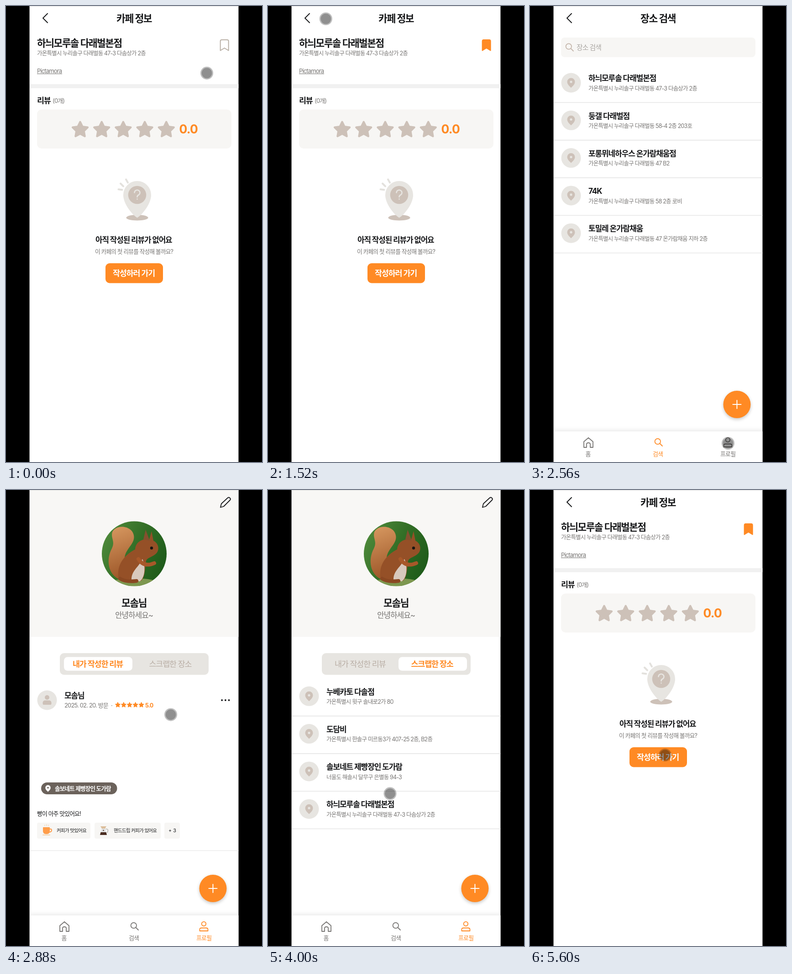
Write an HTML page with a canvas that moves like this. It is 561 px wide and 998 px high and loops after 5680 ms.

```html
<!DOCTYPE html>
<html lang="ko">
<head>
<meta charset="utf-8">
<style>
html, body { margin: 0; width: 561px; height: 998px; overflow: hidden; background: #000; }
canvas { display: block; }
</style>
</head>
<body>
<canvas id="stage" width="561" height="998"></canvas>
<script>
const ctx = document.getElementById('stage').getContext('2d');
const LOOP = 5680;
const ORANGE = '#ff8a24', INK = '#17181a', GRAY = '#777573', TAN = '#cdc1b8', STONE = '#e7e5e1', PALE = '#f7f6f4';

const SHOP = '하늬모루솔 다래벌본점';
const SHOP_ADDRESS = '가온특별시 누리솔구 다래벌동 47-3 다솜상가 2층';
const USER = '모솜님';
const BAKERY = '솔보네트 제빵장인 도가람';
const PLACES = [
  [SHOP, SHOP_ADDRESS],
  ['둥갤 다래벌점', '가온특별시 누리솔구 다래벌동 58-4 2층 203호'],
  ['포롱뮈네하우스 온가람채움점', '가온특별시 누리솔구 다래벌동 47 B2'],
  ['74K', '가온특별시 누리솔구 다래벌동 58 2층 로비'],
  ['토밀레 온가람채움', '가온특별시 누리솔구 다래벌동 47 온가람채움 지하 2층']
];
const SCRAPS = [
  ['누베카토 다솔점', '가온특별시 윗구 솔내로2가 80'],
  ['도담비', '가온특별시 한솔구 미르동3가 407-25 2층, B2층'],
  [BAKERY, '너울도 해솔시 달무구 은별동 94-3'],
  [SHOP, SHOP_ADDRESS]
];

// Pointer stops: time, x, y
const POINTER = [
  [0, 440, 147], [400, 481, 88], [1040, 481, 88], [1280, 392, 60], [1520, 127, 28], [1680, 86, 27],
  [2000, 86, 27], [2160, 140, 131], [2480, 434, 957], [2640, 434, 957], [2880, 361, 492],
  [3120, 374, 387], [3520, 374, 387], [4080, 250, 710], [4720, 250, 710], [5080, 296, 580], [LOOP, 296, 580]
];

// Text starts at x and is centred vertically on cy
function text(s, x, cy, size, color = INK, weight = 400, spacing = -0.065) {
  ctx.font = `${weight} ${size}px Inter, "Noto Sans CJK KR", "Noto Sans CJK", sans-serif`;
  ctx.letterSpacing = spacing * size + 'px';
  ctx.fillStyle = color;
  ctx.fillText(s, x, cy + size * 0.37);
}

function box(x, y, w, h, r, color) {
  ctx.fillStyle = color;
  ctx.beginPath();
  ctx.roundRect(x, y, w, h, r);
  ctx.fill();
}

function dot(x, y, r, color, ry = r) {
  ctx.fillStyle = color;
  ctx.beginPath();
  ctx.ellipse(x, y, r, ry, 0, 0, 7);
  ctx.fill();
}

// Icon paths are relative to (x, y)
function icon(d, x, y, { fill, stroke, width = 2 }) {
  const path = new Path2D(d);
  ctx.save();
  ctx.translate(x, y);
  ctx.lineCap = ctx.lineJoin = 'round';
  ctx.lineWidth = width;
  if (fill) { ctx.fillStyle = fill; ctx.fill(path); }
  if (stroke) { ctx.strokeStyle = stroke; ctx.stroke(path); }
  ctx.restore();
}

function star(x, y, r, color, width) {
  let d = '';
  for (let i = 0; i < 10; i++) {
    const a = i * Math.PI / 5, k = i % 2 ? r * 0.5 : r;
    d += `${i ? 'L' : 'M'}${k * Math.sin(a)} ${-k * Math.cos(a)}`;
  }
  icon(d + 'Z', x, y, { fill: color, stroke: color, width });
}

function smallPin(x, y, color, hole, k = 1) {
  icon(`M0 ${11 * k}C${-4 * k} ${7 * k} ${-8.5 * k} ${3 * k} ${-8.5 * k} ${-2 * k}A${8.5 * k} ${8.5 * k} 0 0 1 ${8.5 * k} ${-2 * k}C${8.5 * k} ${3 * k} ${4 * k} ${7 * k} 0 ${11 * k}Z`, x, y, { fill: color });
  dot(x, y - 2 * k, 2.6 * k, hole);
}

function magnifier(x, y, color) {
  icon('M4 -2A6.2 6.2 0 1 1 -8.4 -2A6.2 6.2 0 1 1 4 -2M2.5 2.5L8 8', x, y, { stroke: color, width: 1.8 });
}

function header(title, pressed) {
  if (pressed) dot(86, 27, 17.5, '#f1f1f1');
  icon('M5 -10L-5 0L5 10', 86, 26.5, { stroke: INK });
  if (title) text(title, 242, 27, 21.5, INK, 700);
}

function places(list, top) {
  list.forEach(([name, address], i) => {
    const y = top + i * 82.3;
    dot(90, y, 21.5, STONE);
    smallPin(90, y, TAN, STONE);
    text(name, 128, y - 10, 17, INK, 700);
    text(address, 128, y + 12, 12.5, GRAY);
    box(52, y + 42.5, 458, 1.6, 0, '#e6e6e6');
  });
}

function navigation(active) {
  ctx.save();
  ctx.shadowColor = 'rgba(0,0,0,.22)';
  ctx.shadowBlur = 7;
  ctx.shadowOffsetY = 3;
  dot(453.5, 872, 30, ORANGE);
  ctx.shadowColor = 'rgba(0,0,0,.1)';
  ctx.shadowBlur = 10;
  ctx.shadowOffsetY = -2;
  box(52, 931, 458, 67, 0, '#fff');
  ctx.restore();
  icon('M-9 0H9M0 -9V9', 453.5, 872, { stroke: '#fff' });
  const tint = tab => tab === active ? ORANGE : GRAY;
  icon('M-10 -2.5L0 -11L10 -2.5V10H4V3Q4 0 0 0Q-4 0 -4 3V10H-10Z', 128, 956, { stroke: tint('home'), width: 1.8 });
  magnifier(282, 955, tint('search'));
  icon('M4.7 -5.5A4.7 4.7 0 1 1 -4.7 -5.5A4.7 4.7 0 1 1 4.7 -5.5M-9 10V7Q-9 3.5 -5 3.5H5Q9 3.5 9 7V10Z', 433.5, 955, { stroke: tint('profile'), width: 1.8 });
  text('홈', 121.5, 980, 13, tint('home'));
  text('검색', 269, 980, 13, tint('search'), active === 'search' ? 500 : 400);
  text('프로필', 417, 980, 13, tint('profile'), active === 'profile' ? 500 : 400);
}

function cafe(saved, pressed) {
  header('카페 정보', pressed);
  text(SHOP, 68, 81, 21.3, INK, 700);
  text(SHOP_ADDRESS, 68, 103.5, 12.5, GRAY);
  text('Pictamora', 68, 142, 13, GRAY);
  box(68, 148, 55, 1, 0, GRAY);
  icon('M-9 -9Q-9 -12 -6 -12H6Q9 -12 9 -9V11.5L0 6L-9 11.5Z', 478.7, 86,
    saved ? { fill: ORANGE, stroke: ORANGE } : { stroke: '#b9b0a6' });
  box(52, 171, 458, 9, 0, '#f1f1f1');
  text('리뷰', 68, 207, 17.3, INK, 700);
  text('(0개)', 102, 207.5, 13, GRAY);
  box(68, 226.5, 426, 85.5, 10, PALE);
  for (let i = 0; i < 5; i++) star(162.5 + i * 47.2, 271, 17.5, TAN, 4);
  text('0.0', 379.5, 269, 26.5, ORANGE, 700, -0.03);

  dot(287.5, 463.3, 24, TAN, 6.3);
  icon('M0 50C-9 45 -30.5 21 -30.5 0A30.5 30.5 0 0 1 30.5 0C30.5 21 9 45 0 50Z', 287.5, 413.5, { fill: STONE });
  dot(287.5, 413.5, 19.8, TAN);
  icon('M-6 -4.5A6 5.7 0 1 1 3 0.5Q0 2 0 5M0 9.5V9.6', 287.5, 413, { stroke: STONE, width: 2.6 });
  icon('M246.5 401.3L254.5 402.3M251 388.5L257 394.5M263 379.5L267 386.5', 0, 0, { stroke: '#e3e1dd', width: 4 });

  text('아직 작성된 리뷰가 없어요', 196, 512, 16.9, INK, 700);
  text('이 카페의 첫 리뷰를 작성해 볼까요?', 195, 537, 12.7, GRAY);
  box(218, 563, 126, 43.5, 9, ORANGE);
  text('작성하러 가기', 234, 585, 17.4, '#fff', 700);
}

function search(pressed) {
  header('장소 검색', pressed);
  box(68, 69, 426, 43, 8, PALE);
  magnifier(87, 90.5, '#c4b5aa');
  text('장소 검색', 102, 91, 14.8, '#aaa6a2');
  places(PLACES, 168);
  navigation('search');
}

function portrait() {
  ctx.save();
  ctx.beginPath();
  ctx.arc(281, 139.5, 71, 0, 7);
  ctx.clip();
  const green = ctx.createLinearGradient(210, 100, 352, 170);
  green.addColorStop(0, '#4f8a3b');
  green.addColorStop(.5, '#326e26');
  green.addColorStop(1, '#1d5a19');
  box(210, 68, 142, 142, 0, green);
  dot(281, 220, 78, '#7d974f', 27);
  const tail = ctx.createLinearGradient(220, 80, 262, 195);
  tail.addColorStop(0, '#d99a62');
  tail.addColorStop(1, '#9a5426');
  icon('M254 198C222 188 219 151 232 128C240 112 229 106 233 92C242 74 276 78 280 99C284 117 262 128 260 148Z', 0, 0, { fill: tail });
  icon('M247 196C241 165 258 143 283 130C284 113 299 106 314 108L319 90L323 111C334 116 337 130 330 138C322 147 310 147 307 155C304 174 305 190 296 199Z', 0, 0, { fill: '#955027' });
  icon('M301 108L306 87L315 111Z', 0, 0, { fill: '#84502f' });
  icon('M275 196C275 176 291 169 299 151C307 170 304 193 293 200Z', 0, 0, { fill: '#d8c9bd' });
  icon('M290 151Q302 170 325 160', 0, 0, { stroke: '#a85829', width: 8 });
  icon('M250 194Q262 202 286 199', 0, 0, { stroke: '#8a4822', width: 8 });
  dot(319, 127, 3.2, '#191512');
  ctx.restore();
}

function review() {
  dot(90, 460, 21.5, STONE);
  dot(90, 454, 5, TAN);
  box(80.5, 460.5, 19, 9.5, [5, 5, 2, 2], TAN);
  text(USER, 128, 450, 17, INK, 700);
  text('2025. 02. 20. 방문', 128, 471.5, 13, GRAY);
  text('·', 230, 471.5, 13, GRAY);
  for (let i = 0; i < 5; i++) star(245 + i * 12.9, 470.5, 5.8, ORANGE, 1);
  text('5.0', 305, 471.5, 12.7, ORANGE, 700);
  for (let i = 0; i < 3; i++) dot(473.2 + i * 7.7, 460, 1.9, INK);
  box(77, 640, 166.5, 26, 13, '#6b625b');
  smallPin(92, 653, '#fff', '#6b625b', .68);
  text(BAKERY, 107, 653.5, 12.6, '#fff', 700);
  text('빵이 아주 맛있어요!', 68, 708, 12.8);

  box(68, 728, 117, 35, 4, PALE);
  icon('M96 742H98Q100 742 100 745Q100 748 95 749', 0, 0, { stroke: '#ff9d4a' });
  box(81, 738, 15, 15, [1, 1, 6, 6], '#ff9d4a');
  box(80, 754, 17, 2, 1, '#f3d3ad');
  icon('M85 735V733M89 735V732M93 735V733', 0, 0, { stroke: '#f0d9bf', width: 1.5 });
  text('커피가 맛있어요', 111, 745.5, 10.5);

  box(194, 728, 145, 35, 4, PALE);
  icon('M219 742Q226 741 222 750', 0, 0, { stroke: '#b9b4af', width: 1.5 });
  icon('M207 736H220L217 741H210Z', 0, 0, { fill: '#dcbf9c' });
  icon('M210 741H217L221 755H206Z', 0, 0, { fill: '#e2e4e5' });
  icon('M207.5 749H219.5L221 755H206Z', 0, 0, { fill: '#4b2d21' });
  dot(213.5, 745, 1.2, '#4b2d21');
  text('핸드드립 커피가 있어요', 236, 745.5, 10.5);

  box(347, 728, 34, 35, 4, PALE);
  text('+ 3', 356, 745.5, 10.8, INK, 400, 0);
  box(52, 788.5, 458, 1.6, 0, '#ececec');
}

function profile(scraps, tapped) {
  box(52, 0, 458, 321.5, 0, '#f8f7f5');
  icon('M-11 11L-9 3L5 -10Q8 -12 10 -9Q12 -7 10 -5L-4 9Z', 481, 27, { stroke: INK, width: 1.8 });
  portrait();
  text(USER, 253, 247, 21.5, INK, 700);
  text('안녕하세요~', 239, 273.5, 17, GRAY);
  box(118, 357, 326, 47.5, 9, STONE);
  box(scraps ? 286 : 127, 365.5, 150, 30, 8, '#fff');
  const tab = (label, x, on) => text(label, x, 380.5, 17.4, on ? ORANGE : '#b9aea5', on ? 700 : 400);
  tab('내가 작성한 리뷰', 146, !scraps);
  tab('스크랩한 장소', 313.5, scraps);
  if (tapped) box(286, 365.5, 150, 30, 0, 'rgba(51,181,229,.4)');
  if (scraps) places(SCRAPS, 451.3); else review();
  navigation('profile');
}

function loading() {
  header();
  text('카페 정보', 236, 27.5, 22, INK, 700, .04);
  text('로딩 중...', 52, 63.5, 18, INK, 400, -.01);
}

function pointer(t) {
  const i = POINTER.findIndex(stop => stop[0] > t);
  const [t0, x0, y0] = POINTER[i - 1], [t1, x1, y1] = POINTER[i];
  const k = (t - t0) / (t1 - t0);
  const x = x0 + (x1 - x0) * k, y = y0 + (y1 - y0) * k;
  dot(x, y, 11.5, 'rgba(0,0,0,.44)');
  ctx.strokeStyle = 'rgba(0,0,0,.25)';
  ctx.lineWidth = 2.6;
  ctx.beginPath();
  ctx.arc(x, y, 12.8, 0, 7);
  ctx.stroke();
}

function draw(now) {
  const t = now % LOOP;
  ctx.fillStyle = '#000';
  ctx.fillRect(0, 0, 561, 998);
  ctx.save();
  ctx.beginPath();
  ctx.rect(51.5, 0, 458, 998);
  ctx.clip();
  box(51, 0, 459, 998, 0, '#fff');
  const pressed = t >= 1760 && t < 2240;
  if (t < 2000) cafe(t >= 640, pressed);
  else if (t < 2640) search(pressed);
  else if (t < 4560) profile(t >= 3280, t >= 3280 && t < 3440);
  else if (t < 4720) loading();
  else cafe(true, false);
  box(51, 0, 459, 1, 0, '#dcdcdc');
  pointer(t);
  ctx.restore();
  requestAnimationFrame(() => draw(performance.now()));
}
draw(performance.now());
</script>
</body>
</html>
```
